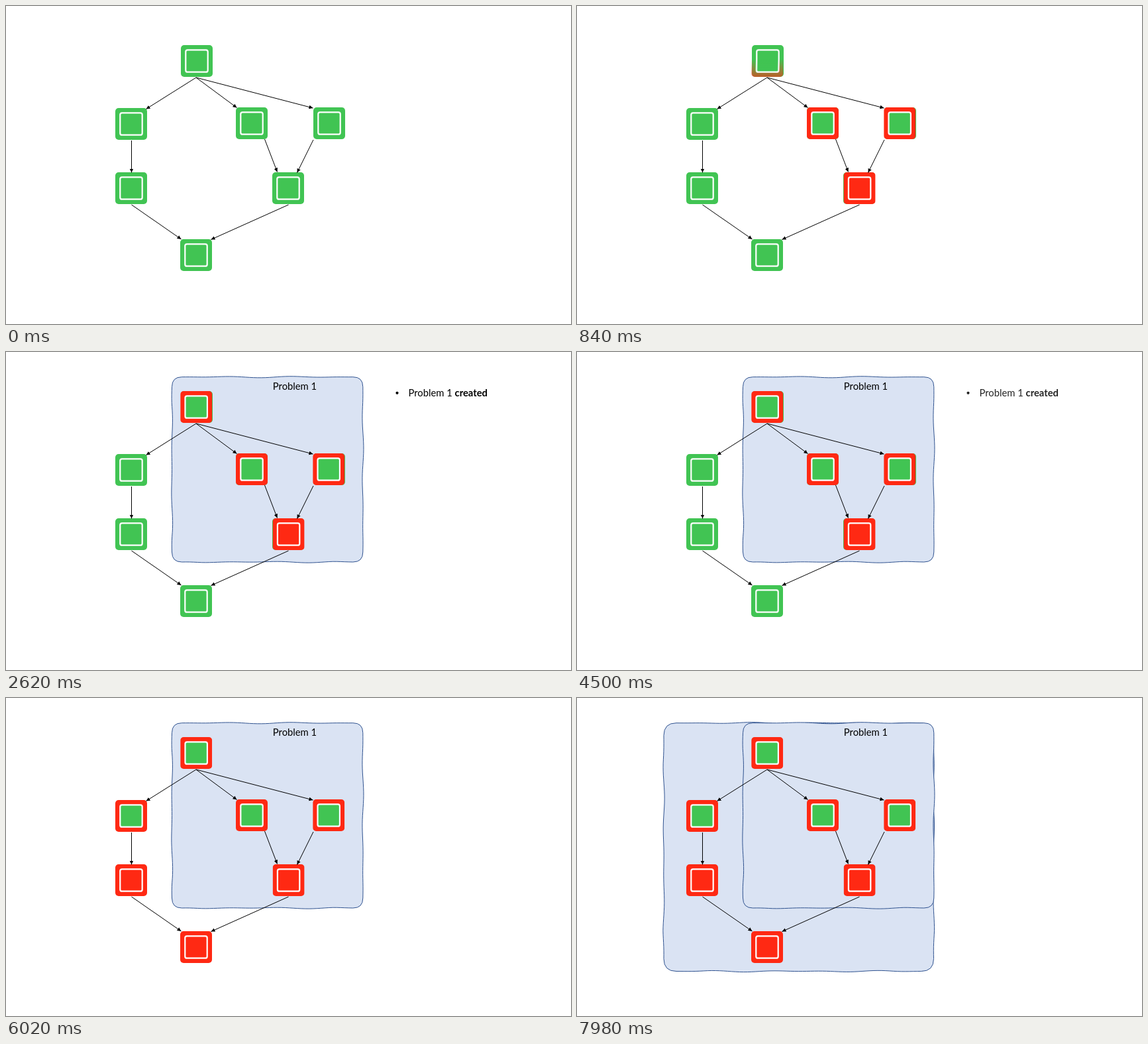
An HTML page that plays this animation: 853x480 px, repeating every 8000 ms.

```html
<!DOCTYPE html>
<html lang="en">
<head>
<meta charset="utf-8">
<title>Problem propagation</title>
<style>
  html, body { margin: 0; width: 100%; height: 100%; overflow: hidden; background: #fff; }
  svg { display: block; width: 853px; height: 480px; }
  text { font: 14.8px Lato, "Open Sans", sans-serif; }
  .bold { font-weight: 700; }
  .area { fill: #dae3f3; stroke: #2f528f; stroke-width: 1; stroke-linejoin: round; }
  .arrow { stroke: #000; stroke-width: 1; marker-end: url(#head); }
</style>
</head>
<body>
<svg id="stage" viewBox="0 0 853 480">
  <defs>
    <marker id="head" markerUnits="userSpaceOnUse" markerWidth="7" markerHeight="6" refX="6" refY="3" orient="auto">
      <path d="M0 0.2L6 3L0 5.8Z"/>
    </marker>
  </defs>
  <path id="outer" class="area"/>
  <g id="inner">
    <path class="area"/>
    <text x="436" y="57" text-anchor="middle">Problem 1</text>
  </g>
  <g id="nodes"></g>
  <g id="arrows"></g>
  <g id="note">
    <circle cx="590.5" cy="61.8" r="2.1"/>
    <text x="607.5" y="67">Problem 1 <tspan class="bold" x="677.5">created</tspan></text>
  </g>
</svg>
<script>
const LOOP = 8000, STEP = 70, FADE = 490, SIZE = 48, SOFT = 0.85;
const GREEN = '#41c453', RED = '#ff2913';

// Spans in which the picture moves; it rests in between.
const SPANS = [[0, 1120], [1660, 2150], [2620, 2620], [4500, 4990], [5530, 6020], [7560, 7980]];

// dx shifts the red state; start and span time its wipe.
const NODES = [
  { x: 264, y: 59, dx: -0.8, core: GREEN, start: 720, span: 400 },
  { x: 347, y: 153, dx: 0, core: GREEN, start: 355, span: 365 },
  { x: 464, y: 153, dx: -0.8, core: GREEN, start: 355, span: 365 },
  { x: 402, y: 251, dx: 0.6, core: RED, start: 0, span: 355 },
  { x: 263, y: 352, dx: 0, core: RED, start: 5420, span: 198 },
  { x: 165, y: 251, dx: 0, core: RED, start: 5618, span: 198 },
  { x: 165, y: 154, dx: 0, core: GREEN, start: 5816, span: 198 }
];

const ARROWS = [
  [287, 108, 211.5, 155.5], [287, 108, 348.5, 153.5], [287, 108, 463.5, 154],
  [189.5, 203, 189.5, 251.5], [390.5, 201, 409.5, 250.5], [464, 202, 439.5, 251.5],
  [189.5, 300, 264.5, 352], [426.5, 300, 309.5, 352.5]
];

const $ = id => document.getElementById(id);
const clamp = v => Math.max(0, Math.min(1, v));

function add(parent, tag, attrs) {
  const el = document.createElementNS('http://www.w3.org/2000/svg', tag);
  for (const name in attrs) el.setAttribute(name, attrs[name]);
  return parent.appendChild(el);
}

// Rounded box with slightly wavering, hand-drawn edges.
function sketch(x0, y0, x1, y1, r, seed) {
  const wave = (v, k) =>
    0.6 * Math.sin(v / 13 + seed + k * 2) + 0.55 * Math.sin(v / 21 + seed * 3 + k);
  const edge = (ax, ay, bx, by, k) => {
    const length = Math.hypot(bx - ax, by - ay), n = Math.round(length / 6);
    let d = '';
    for (let i = 0; i <= n; i++) {
      const u = i / n, off = wave(u * length, k) * Math.min(1, 8 * u, 8 * (1 - u));
      const x = ax + (bx - ax) * u + (ax === bx ? off : 0);
      const y = ay + (by - ay) * u + (ay === by ? off : 0);
      d += `L${x.toFixed(2)} ${y.toFixed(2)}`;
    }
    return d;
  };
  const corner = (cx, cy, x, y) => `Q${cx} ${cy} ${x} ${y}`;
  return `M${x0 + r} ${y0}` +
    edge(x0 + r, y0, x1 - r, y0, 0) + corner(x1, y0, x1, y0 + r) +
    edge(x1, y0 + r, x1, y1 - r, 1) + corner(x1, y1, x1 - r, y1) +
    edge(x1 - r, y1, x0 + r, y1, 2) + corner(x0, y1, x0, y1 - r) +
    edge(x0, y1 - r, x0, y0 + r, 3) + corner(x0, y0, x0 + r, y0) + 'Z';
}

function tile(x, y, frame, core) {
  const g = add($('nodes'), 'g', { transform: `translate(${x} ${y})` });
  add(g, 'rect', { width: SIZE, height: SIZE, rx: 5, fill: frame });
  add(g, 'rect', { x: 7.3, y: 7.3, width: 33.4, height: 33.4, rx: 2.8, fill: core, stroke: '#fff', 'stroke-width': 2.2 });
  return g;
}

function buildNode(node, i) {
  const defs = document.querySelector('defs');
  node.fade = add(defs, 'linearGradient', { id: 'fade' + i, x1: 0, x2: 0 });
  add(node.fade, 'stop', { offset: 0, 'stop-color': '#fff' });
  add(node.fade, 'stop', { offset: 1, 'stop-color': '#fff', 'stop-opacity': 0 });
  const mask = add(defs, 'mask', { id: 'wipe' + i, maskContentUnits: 'objectBoundingBox' });
  add(mask, 'rect', { width: 1, height: 1, fill: `url(#fade${i})` });
  node.base = tile(node.x, node.y, GREEN, GREEN);
  node.alert = tile(node.x + node.dx, node.y, RED, node.core);
  node.alert.setAttribute('mask', `url(#wipe${i})`);
}

// Soft-edged wipe from the bottom up.
function wipe(node, t) {
  const p = clamp((t - node.start) / node.span), reach = p * (1 + SOFT);
  node.fade.setAttribute('y1', 1 - reach + SOFT);
  node.fade.setAttribute('y2', 1 - reach);
  node.alert.style.display = p > 0 ? '' : 'none';
  node.base.style.display = p === 1 && t > 4500 ? 'none' : '';
}

function snap(t) {
  const [from, to] = SPANS.filter(span => span[0] <= t).pop();
  return Math.min(to, from + Math.floor((t - from) / STEP) * STEP);
}

function draw(time) {
  const t = snap(time);
  NODES.forEach(node => wipe(node, t));
  $('inner').style.opacity = clamp((t - 1590) / FADE);
  $('outer').style.opacity = clamp((t - 7490) / FADE);
  $('note').style.opacity = t < 2620 ? 0 : 1 - clamp((t - 4430) / FADE);
}

$('outer').setAttribute('d', sketch(131, 37.7, 538.5, 412.5, 19, 2));
$('inner').firstElementChild.setAttribute('d', sketch(250.5, 37.7, 538.8, 317, 15, 5));
NODES.forEach(buildNode);
ARROWS.forEach(([x1, y1, x2, y2]) => add($('arrows'), 'line', { class: 'arrow', x1, y1, x2, y2 }));

const begin = performance.now();
function tick() {
  draw((performance.now() - begin) % LOOP);
  requestAnimationFrame(tick);
}
tick();
</script>
</body>
</html>
```
